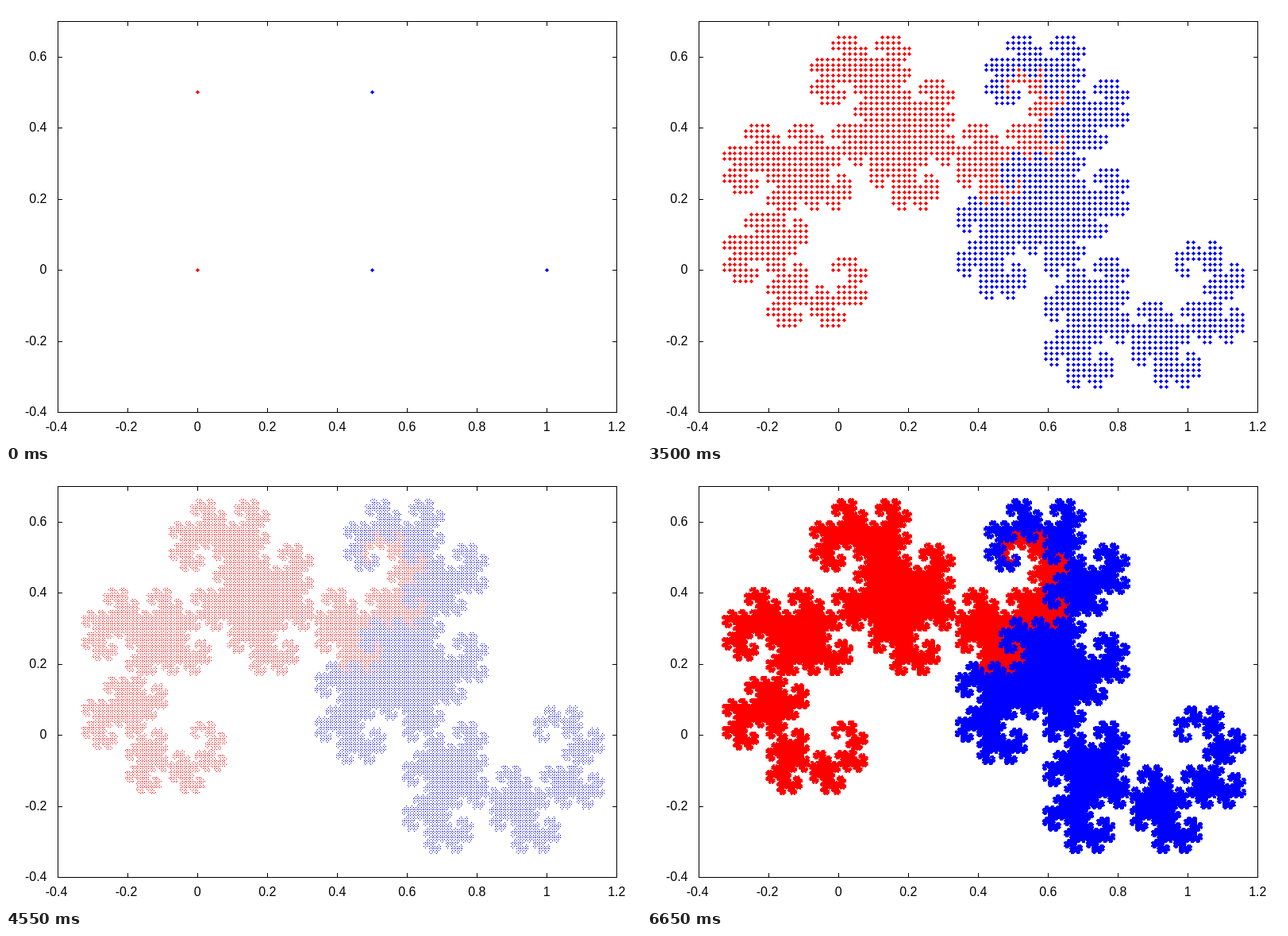
An HTML page with a canvas for the animation above (7000 ms loop, 800x550 px).

```html
<!DOCTYPE html>
<html lang="en">
<head>
<meta charset="utf-8">
<title>Dragon curve</title>
<style>
  html, body { margin: 0; width: 800px; height: 550px; overflow: hidden; background: #fff; }
  canvas, svg { position: absolute; left: 0; top: 0; display: block; }
  text { font: 16px "Liberation Sans", Arial, sans-serif; fill: #000; }
</style>
</head>
<body>
<canvas id="plot" width="800" height="550"></canvas>
<svg id="axes" width="800" height="550" viewBox="0 0 800 550"></svg>
<script>
const W = 800, H = 550;
const LEFT = 65, RIGHT = 769, TOP = 19, BOTTOM = 511;
const STEP_MS = 350, STEPS = 20, FIRST_ORDER = 2;
const RED = 0xff0000ff, BLUE = 0xffff0000, WHITE = 0xffffffff;

const scaleX = (RIGHT - LEFT) / 1.6;
const scaleY = (BOTTOM - TOP) / 1.1;
const mapX = x => LEFT + Math.floor((x + 0.4) * scaleX + 0.5);
const mapY = y => BOTTOM - Math.floor((y + 0.4) * scaleY + 0.5);

// Axes
const axes = document.getElementById('axes');

function add(name, attrs, content = '') {
  const node = document.createElementNS('http://www.w3.org/2000/svg', name);
  for (const key in attrs) node.setAttribute(key, attrs[key]);
  node.textContent = content;
  axes.append(node);
}

const line = d => add('path', {
  d, fill: 'none', stroke: '#000', 'stroke-width': 1, 'shape-rendering': 'crispEdges'
});
const label = (x, y, anchor, value) =>
  add('text', { x, y, 'text-anchor': anchor }, String(value));

line(`M${LEFT + 0.5} ${TOP + 0.5}H${RIGHT + 0.5}V${BOTTOM + 0.5}H${LEFT + 0.5}Z`);
for (let i = -2; i <= 6; i++) {
  const v = i / 5, x = mapX(v);
  line(`M${x + 0.5} ${TOP}v6M${x + 0.5} ${BOTTOM + 1}v-6`);
  label(i < 0 ? x - 1.5 : x + 0.3, 535, 'middle', v);
}
for (let i = -2; i <= 3; i++) {
  const v = i / 5, y = mapY(v);
  line(`M${LEFT} ${y + 0.5}h6M${RIGHT + 1} ${y + 0.5}h-6`);
  label(51.5, y + 5, 'end', v);
}

// Curve
const ctx = document.getElementById('plot').getContext('2d');
const image = ctx.createImageData(W, H);
const pixels = new Uint32Array(image.data.buffer);

function mark(x, y, r, color) {
  for (let dy = -r; dy <= r; dy++) {
    const span = r - Math.abs(dy), row = (y + dy) * W + x;
    for (let dx = -span; dx <= span; dx++) pixels[row + dx] = color;
  }
}

function drawDragon(order) {
  const count = 2 ** order, half = count / 2;
  const r = order < 14 ? 2 : order === 14 ? 1 : 0;

  // One segment is ((1 + i) / 2) ^ order
  let u = 1, v = 0;
  for (let i = 0; i < order; i++) [u, v] = [(u - v) / 2, (u + v) / 2];

  pixels.fill(WHITE);
  let x = 0, y = 0;
  for (let k = 0; k <= count; k++) {
    mark(mapX(x), mapY(y), r, k < half ? RED : BLUE);
    if (k) {
      // Paper-folding turn
      const t = u;
      if (((k & -k) << 1) & k) { u = -v; v = t; }
      else { u = v; v = -t; }
    }
    x += u;
    y += v;
  }
  ctx.putImageData(image, 0, 0);
}

const start = performance.now();
let shown = -1;

function tick() {
  const step = Math.floor((performance.now() - start) / STEP_MS) % STEPS;
  if (step !== shown) {
    shown = step;
    drawDragon(FIRST_ORDER + step);
  }
  requestAnimationFrame(tick);
}
tick();
</script>
</body>
</html>
```
